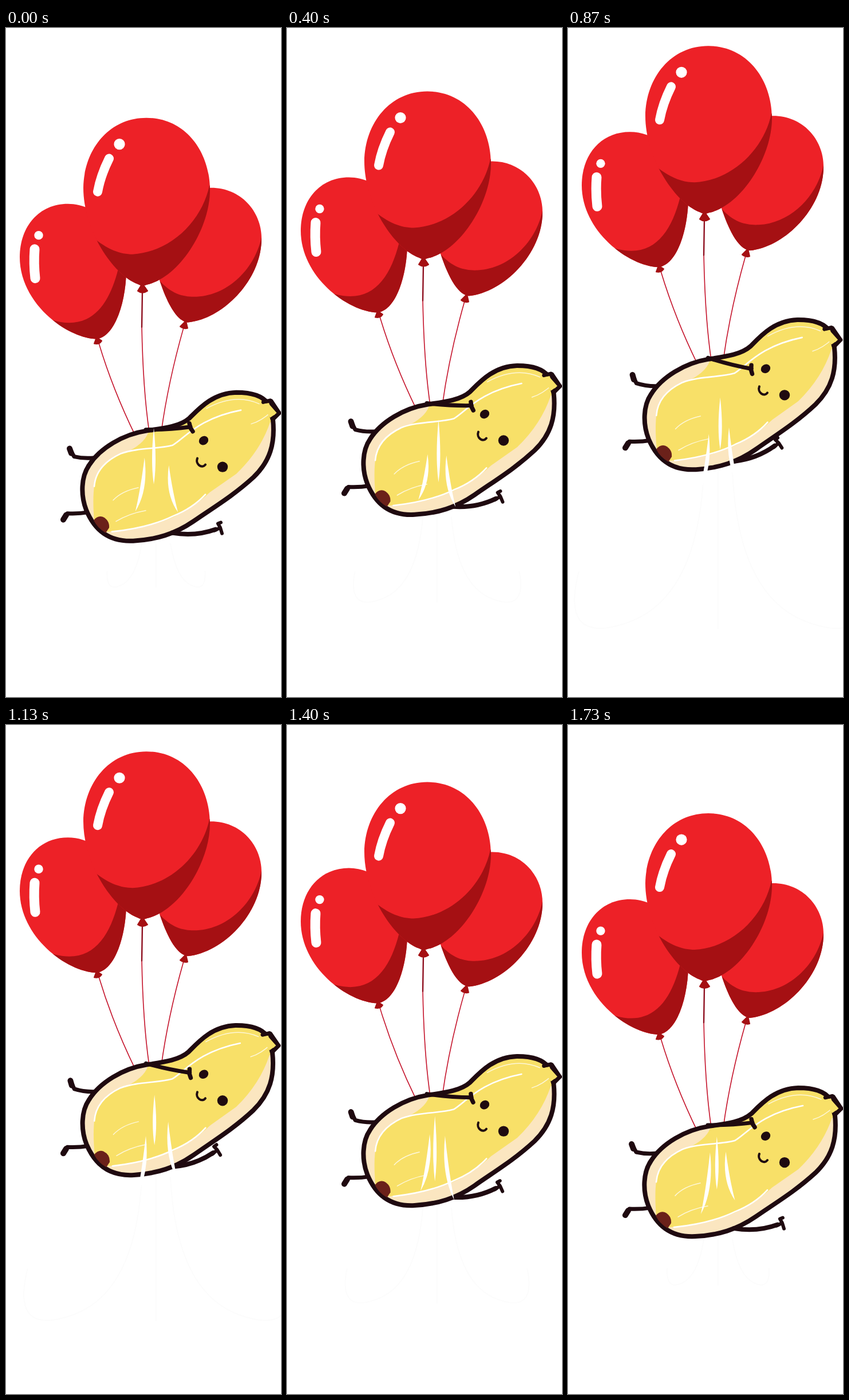
Animation, 480 px wide and 1167 px high, one loop 1.79 s. Source, as an HTML page:

```html
<!DOCTYPE html>
<html lang="en">
<head>
<meta charset="utf-8">
<title>Peanut on balloons</title>
<style>
html, body { margin: 0; width: 100%; height: 100%; overflow: hidden; background: #fff; }
svg { display: block; width: 100%; height: 100%; }
.line { fill: none; stroke-linecap: round; stroke-linejoin: round; }
.ink { stroke: #1f0a10; }
.red { fill: #ed2127; }
.dark { fill: #a51013; }
.shine { stroke: #fff; }
</style>
</head>
<body>
<svg viewBox="0 0 480 1167">
  <defs>
    <path id="shell" d="M457 655C447 641 427 636 402 636C362 637 338 663 320 681C303 696 273 699 245 703C205 709 164 733 145 763C131 783 130 815 140 841C155 878 182 897 222 895C262 893 295 883 327 861C360 838 396 817 432 784C461 756 470 725 466 684Z"/>
    <clipPath id="inside"><use href="#shell"/></clipPath>
    <path id="left" d="M24 400C24 346 58 307 108 307C160 307 210 355 210 425C209 475 192 538 158 543C105 541 24 480 24 400Z"/>
    <path id="mid" d="M245 157C312 157 355 214 356 281C357 350 302 436 246 448Q238 452 230 447C186 430 135 352 135 279C136 212 180 157 245 157Z"/>
    <path id="right" d="M358 279C409 279 446 319 446 368C446 440 378 508 317 514C296 511 279 474 268 440C262 350 290 279 358 279Z"/>
    <clipPath id="inLeft"><use href="#left"/></clipPath>
    <clipPath id="inMid"><use href="#mid"/></clipPath>
    <clipPath id="inRight"><use href="#right"/></clipPath>
  </defs>

  <path id="trail" class="line" stroke="#fcfcfc" stroke-width="2"/>
  <g id="float">
    <g class="line" stroke="#c4122a" stroke-width="1.6">
      <path d="M162 550Q186 630 226 712"/>
      <path d="M237 520Q239 630 250 705"/>
      <path d="M310 523Q283 618 271 705"/>
      <path d="M238 460L237 522" stroke="#8e0f1f" stroke-width="2.4"/>
    </g>

    <use href="#left" class="red"/>
    <path class="dark" clip-path="url(#inLeft)" d="M60 502C140 538 178 492 196 420L225 400V560H60Z"/>
    <use href="#right" class="red"/>
    <path class="dark" clip-path="url(#inRight)" d="M260 431C285 465 310 470 333 469C390 466 435 418 446 365L470 365V530H260Z"/>
    <use href="#mid" class="red"/>
    <path class="dark" clip-path="url(#inMid)" d="M150 364C177 387 200 395 221 395C290 391 343 334 355 275L380 275V470H150Z"/>
    <g class="dark" stroke="#a51013" stroke-width="2" stroke-linejoin="round">
      <path d="M238 446L230 459Q238 465 247 459Z"/>
      <path d="M158 540L154 551Q163 553 167 546Z"/>
      <path d="M314 511L304 521Q311 526 317 524Z"/>
    </g>
    <g fill="#fff">
      <circle cx="198" cy="203" r="9.6"/>
      <circle cx="57" cy="362" r="7.7"/>
    </g>
    <path class="line shine" stroke-width="16" d="M180 228Q165 258 160 286"/>
    <path class="line shine" stroke-width="17" d="M50 386Q48 411 51 437"/>

    <g class="line ink">
      <g id="legTop">
        <path stroke-width="7" d="M111 734L119 748Q136 752 155 750"/>
        <path stroke-width="10" d="M111 734L114 742"/>
      </g>
      <path stroke-width="7" d="M101 858L107 847Q126 848 144 845"/>
      <path stroke-width="10" d="M100 858L105 850"/>
    </g>

    <g id="body">
      <path fill="#f8e068" class="ink" stroke-width="7" stroke-linejoin="round" d="M451 657L463 651L477 672L466 683Z"/>
      <use href="#shell" fill="#f8e068"/>
      <g clip-path="url(#inside)">
        <path fill="#fbe6c0" d="M125 870V700H250Q246 722 215 738Q174 750 160 777Q149 800 154 860Z"/>
        <path fill="#fbe6c0" d="M160 880Q230 877 270 862Q318 846 356 810L402 778Q444 738 461 688H480V910H160Z"/>
        <g class="line shine" stroke-width="2.6">
          <path d="M154 800Q157 763 200 743C230 732 266 735 291 728C312 716 336 681 410 667"/>
          <path d="M185 879Q250 872 291 852Q326 838 348 814"/>
          <g stroke-width="1.5" opacity=".75">
            <path d="M350 664Q400 637 442 656"/>
            <path d="M428 691Q446 686 464 669"/>
            <path d="M187 824Q202 808 231 802"/>
            <path d="M192 861Q215 847 244 842"/>
          </g>
        </g>
      </g>
      <use href="#shell" class="line ink" stroke-width="8"/>
      <path fill="#f8e068" d="M445 656L462 654L474 671L461 680Z"/>
      <path class="line ink" stroke-width="6.5" d="M449 653L461 650L463 656L477 672L465 683"/>
      <path fill="#6b211a" d="M153 859Q160 850 169 853Q181 859 180 872L174 881Q160 873 153 859Z"/>
    </g>

    <g fill="#1f0a10">
      <ellipse cx="345" cy="720" rx="8.6" ry="7.4" transform="rotate(-35 345 720)"/>
      <circle cx="378" cy="766" r="9.2"/>
    </g>
    <path class="line ink" stroke-width="4" d="M334 751C330 761 342 770 348 762"/>

    <g id="armTop" class="line ink">
      <path stroke-width="7" d="M244 701Q285 701 322 696"/>
      <path stroke-width="7.5" d="M320 690L322 698L326 704"/>
    </g>
    <g id="armLow" class="line ink">
      <path stroke-width="8" d="M290 881Q330 888 366 875"/>
      <path stroke-width="6" d="M364 877L374 872L370 865L375 863M374 872L377 882"/>
    </g>
  </g>
  <path id="wind" fill="#fff"/>
</svg>

<script>
const LOOP = 1790, STEP = 200 / 3, STEPS = 27, RISE = 127, LAG = 30;
const LANES = [-1, 0, 1];
const $ = id => document.getElementById(id);
const turn = (id, angle, x, y) => $(id).setAttribute('transform', `rotate(${angle} ${x} ${y})`);

// Repeatable noise from -1 to 1
const noise = seed => {
  const v = Math.sin(seed * 12.9898) * 43758.5453;
  return 2 * (v - Math.floor(v)) - 1;
};

// White tapered streak that fans out to its lane's side
function streak(lane, step, lift) {
  const seed = step * 3 + lane;
  const x = 263 + 17 * lane + 5 * noise(seed);
  const y = 705 - (RISE - 75) * lift + 45 * Math.abs(lane) + 15 * noise(seed + 100);
  const length = 95 + 20 * noise(seed + 200), w = 6 + Math.abs(lane);
  const mid = y + length * 0.6, end = `${x + 16 * lane} ${y + length}`;
  return `M${x} ${y}Q${x - w} ${mid} ${end}Q${x + w} ${mid} ${x} ${y}Z`;
}

// Barely visible curl below the body, longer while it is high
function curl(lane, lift) {
  const x = 262 + 25 * lane, y = 900 - RISE * lift, reach = 60 + 160 * lift;
  return `M${x} ${y}q${lane * 10} ${reach} ${lane * reach * 0.6} ${reach * 1.2}` +
    `t${lane * reach * 0.4} ${-reach * 0.4}`;
}

function draw(ms) {
  const step = Math.min(STEPS - 1, Math.floor((ms % LOOP + 4) / STEP));
  const lift = (1 - Math.cos((step * STEP - LAG) / LOOP * 2 * Math.PI)) / 2;
  $('float').setAttribute('transform', `translate(0 ${-RISE * lift})`);
  turn('body', -0.7 * lift, 290, 780);
  turn('armTop', 18 * lift, 244, 702);
  turn('armLow', -16.5 * lift, 292, 883);
  turn('legTop', 5 * lift, 150, 751);
  $('wind').setAttribute('d', LANES.map(lane => streak(lane, step, lift)).join(''));
  $('trail').setAttribute('d', LANES.map(lane => curl(lane, lift)).join(''));
}

const start = performance.now();
function tick() {
  draw(performance.now() - start);
  requestAnimationFrame(tick);
}
tick();
</script>
</body>
</html>
```
